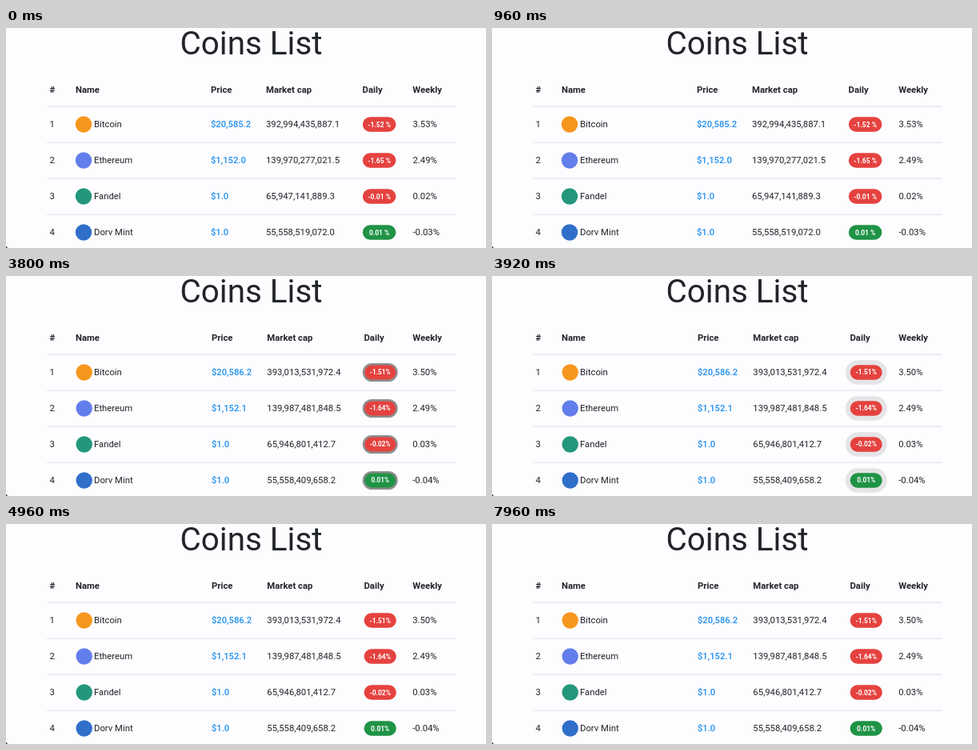
Animation, 600 px wide and 275 px high, one loop 8 s. Source, as an HTML page:

```html
<!DOCTYPE html>
<html lang="en">
<head>
<meta charset="utf-8">
<title>Coins List</title>
<style>
  html, body { margin: 0; width: 100%; height: 100%; overflow: hidden; background: #fdfcfe; }
  svg { display: block; font: 11.3px Roboto, sans-serif; fill: #212529; }
  .title { font-size: 40.4px; text-anchor: middle; }
  .head { font-weight: 700; }
  .price { font-weight: 500; font-size: 11.2px; fill: #1f8fee; }
  .badge { font-weight: 700; font-size: 8.48px; fill: #fff; text-anchor: middle; }
</style>
</head>
<body>
<svg id="stage" width="600" height="275" viewBox="0 0 600 275"></svg>
<script>
const LOOP = 8000, UPDATE = 3720, PULSE = 500, SPREAD = 7;
const RED = '#e5423f', GREEN = '#1f9346';
const stage = document.getElementById('stage');

const coins = [
  { name: 'Bitcoin', color: '#f7961d', values: [
    ['$20,585.2', '392,994,435,887.1', '-1.52', '3.53%'],
    ['$20,586.2', '393,013,531,972.4', '-1.51', '3.50%']] },
  { name: 'Ethereum', color: '#627eea', values: [
    ['$1,152.0', '139,970,277,021.5', '-1.65', '2.49%'],
    ['$1,152.1', '139,987,481,848.5', '-1.64', '2.49%']] },
  { name: 'Fandel', color: '#24967c', values: [
    ['$1.0', '65,947,141,889.3', '-0.01', '0.02%'],
    ['$1.0', '65,946,801,412.7', '-0.02', '0.03%']] },
  { name: 'Dorv Mint', color: '#2f6fca', values: [
    ['$1.0', '55,558,519,072.0', '0.01', '-0.03%'],
    ['$1.0', '55,558,409,658.2', '0.01', '-0.04%']] }
];

// Column positions before and after the price update
const layouts = [
  { icon: 97, price: 256, cap: 325, daily: 445.6, weekly: 508.5, pill: 466.6, width: 41.5, unit: ' %' },
  { icon: 97.7, price: 257, cap: 326.3, daily: 447.5, weekly: 508.2, pill: 467.7, width: 40.2, unit: '%' }
];

const text = (x, y, content, cls = '') => `<text x="${x}" y="${y}" class="${cls}">${content}</text>`;

const pill = (width, height, fill, extra = '') =>
  `<rect x="${-width / 2}" y="${-height / 2}" width="${width}" height="${height}" rx="${height / 2}" fill="${fill}" ${extra}/>`;

function row(coin, index, state) {
  const at = layouts[state], y = 120.5 + index * 45, base = y + 3.4;
  const [price, cap, daily, weekly] = coin.values[state];
  return `<rect x="51" y="${y - 22.9}" width="511" height="1" fill="#dee0e4"/>
    <circle cx="${at.icon}" cy="${y}" r="10.2" fill="${coin.color}"/>` +
    text(54.5, base, index + 1) + text(110, base, coin.name) +
    text(at.price, base, price, 'price') + text(at.cap, base, cap) + text(at.weekly, base, weekly) +
    `<g class="pulse" data-x="${at.pill}" data-y="${y}">` +
    pill(at.width, 18.6, '#000', 'class="halo"') +
    pill(at.width, 18.6, daily < 0 ? RED : GREEN) +
    text(0, 3, daily + at.unit, 'badge') + '</g>';
}

function build(state) {
  const at = layouts[state];
  const heads = [[54.5, '#'], [87, 'Name'], [at.price, 'Price'], [at.cap, 'Market cap'],
    [at.daily, 'Daily'], [508.3, 'Weekly']];
  stage.innerHTML = text(306.5, 33, 'Coins List', 'title') +
    heads.map(([x, label]) => text(x, 81, label, 'head')).join('') +
    coins.map((coin, i) => row(coin, i, state)).join('') +
    '<path d="M0 272.5L2.5 275H0Z" fill="#555"/>';
}

// Same curve as the CSS keyword "ease"
function ease(x) {
  const bezier = (a, b, s) => 3 * a * s * (1 - s) ** 2 + 3 * b * s * s * (1 - s) + s ** 3;
  let low = 0, high = 1;
  for (let i = 0; i < 20; i++) {
    const mid = (low + high) / 2;
    if (bezier(.25, .25, mid) < x) low = mid; else high = mid;
  }
  return bezier(.1, 1, low);
}

function pulseAt(p) {
  if (p < 0 || p >= 1) return { scale: 1, spread: 0, alpha: 0 };
  if (p >= .7) return { scale: 1 - .05 * ease((p - .7) / .3), spread: 0, alpha: 0 };
  const k = ease(p / .7);
  return { scale: .95 + .05 * k, spread: SPREAD * k, alpha: .7 * (1 - k) };
}

let shown = -1;
function draw(now) {
  const t = now % LOOP, state = t < UPDATE ? 0 : 1;
  if (state !== shown) build(shown = state);
  const { scale, spread, alpha } = pulseAt((t - UPDATE) / PULSE);
  for (const group of stage.querySelectorAll('.pulse')) {
    group.setAttribute('transform', `translate(${group.dataset.x} ${group.dataset.y}) scale(${scale})`);
    const halo = group.querySelector('.halo');
    const width = layouts[state].width + 2 * spread, height = 18.6 + 2 * spread;
    const attributes = { x: -width / 2, y: -height / 2, width, height, rx: height / 2, opacity: alpha };
    for (const key in attributes) halo.setAttribute(key, attributes[key]);
  }
  requestAnimationFrame(() => draw(performance.now()));
}
draw(performance.now());
</script>
</body>
</html>
```
